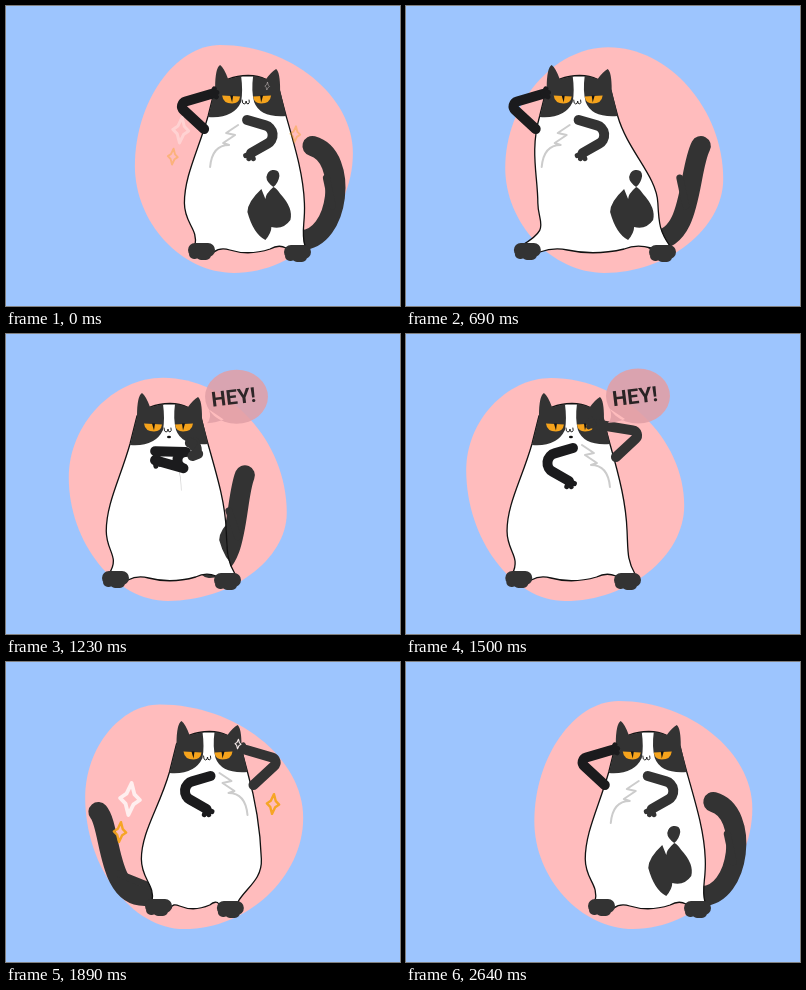
An HTML page with a canvas for the animation above (2.67 s loop, 394 by 300 pixels).

```html
<!DOCTYPE html>
<html lang="en">
<head>
<meta charset="utf-8">
<title>Dancing cat</title>
<style>
html, body { margin: 0; width: 100%; height: 100%; overflow: hidden; background: #9dc5fe; }
canvas { display: block; width: 394px; height: 300px; }
</style>
</head>
<body>
<canvas id="stage" width="394" height="300"></canvas>
<script>
const ctx = document.getElementById('stage').getContext('2d');
const LOOP = 2670, STEP = 30, BEAT = LOOP / 2;
const FUR = '#333', INK = '#1b1b1d', ORANGE = '#f5a31c';

// Smooth 0 to 1 between two times.
function ease(t, from, to) {
  const u = Math.min(1, Math.max(0, (t - from) / (to - from)));
  return u * u * (3 - 2 * u);
}
// 0 at home, 1 away: leaves during [a, b], returns during [c, d], once per loop.
const away = (t, a, b, c, d) => ease(t, a, b) - ease(t, c, d) + ease(t - LOOP, a, b);

const FACE = new Path2D(`M-40 111L-33 82Q-33 62-28 59Q-24 62-20 73L-7 70Q-5 85-7 96Q-15 113-40 111Z
  M38 110L32 84Q32 66 28 63Q23 66 18 73Q10 70 5 70Q3 85 6 96Q12 112 38 110Z`);
const MOUTH = new Path2D('M-6 94Q-6 98-4 98Q-2 98-2 95Q-2 98 0 98Q2 97 1 94');
const EYE = new Path2D('M-9-3L9-2Q8 5 1 5Q-8 5-9-3Z');
const PUPIL = new Path2D('M-1-3L2-3L1 4Z');
const FLUFF = new Path2D('M10 111L22 119L13 121L25 129L19 131Q36 131 38 153');
const PATCH = new Path2D(`M3 164Q10 163 10 170Q9 177 4 181Q-3 176-3 171Q-2 165 3 164Z
  M-8 183Q-22 196-22 206Q-16 228-4 234Q2 227 2 221Q14 224 21 214Q24 202 11 188Q7 182 4 181Q-4 188-4 193Z`);
const STAR = new Path2D('M0-16L4-5L10 0L4 5L0 16L-4 5L-10 0L-4-5Z');

function layer(draw, x = 0, y = 0, sx = 1, sy = sx) {
  ctx.save();
  ctx.translate(x, y);
  ctx.scale(sx, sy);
  draw();
  ctx.restore();
}
function fill(path, color) { ctx.fillStyle = color; ctx.fill(path); }
function stroke(path, color, width) { ctx.strokeStyle = color; ctx.lineWidth = width; ctx.stroke(path); }

// An egg that trails the cat while its four extremes wobble.
function drawBackdrop(t) {
  const phase = 2 * Math.PI * (t - 80) / LOOP, K = .53;
  const x = 203.5 + 35 * Math.cos(phase);
  const points = [
    [x - 21 + 15 * Math.sin(phase), 41.5 - 2.5 * Math.cos(phase)],
    [x + 109, 162 - 18 * Math.cos(phase + .8)],
    [x - 10, 267],
    [x - 109, 150 + 16 * Math.cos(phase - .7)]
  ];
  const p = new Path2D();
  p.moveTo(...points[0]);
  points.forEach(([ax, ay], i) => {
    const [bx, by] = points[(i + 1) % 4], dx = (bx - ax) * K, dy = (by - ay) * K;
    if (i % 2) p.bezierCurveTo(ax, ay + dy, bx - dx, by, bx, by);
    else p.bezierCurveTo(ax + dx, ay, bx, by - dy, bx, by);
  });
  fill(p, '#ffbcbd');
}

function drawTail(t) {
  const swing = 1 - 2 * away(t, 1050, 1890, 2260, 2600);
  const curl = 1 - away(t, 0, 380, 2300, 2640);
  const tail = new Path2D(), tuft = new Path2D();
  tail.moveTo(56 * swing, 234);
  tail.bezierCurveTo(95 * swing, 235, 90 * swing + 15 * curl, 165 - 15 * curl,
    103 * swing - 35 * curl, 145 - 5 * swing);
  tuft.moveTo(82 * swing, 192 - 20 * swing);
  tuft.lineTo(18 + 70 * swing, 212 - 12 * swing);
  stroke(tail, FUR, 20);
  stroke(tuft, FUR, 7);
}

function drawBody(t, head, hip, left, right) {
  const span = (right - left) / 100, slack = (hip + 50 - right) / 2;
  const p = new Path2D(`M${head - 40} 110C${head - 50} 145 ${hip - 60} 170 ${hip - 60} 197
    C${hip - 60} 218 ${hip - 46} 222 ${left - 6} 240L${left + 13} 246
    Q${left + 20 * span} 241 ${left + 30 * span} 244
    Q${(left + right) / 2} 250 ${right - 28 * span} 243
    Q${right - 19 * span} 238 ${right - 11} 242L${right + 8} 240
    C${right + 5 + slack} 226 ${hip + 61} 218 ${hip + 60} 197
    C${hip + 59} 170 ${head + 48} 145 ${head + 38} 110
    L${head + 31} 84Q${head + 20} 70 ${head} 69.5Q${head - 22} 70 ${head - 33} 82Z`);
  fill(p, '#fff');
  const turn = 25 + 12 * away(t, 0, 1000, 2290, 2600) + 62 * away(t, 1000, 1400, 2290, 2600);
  layer(() => {
    ctx.clip(p);
    ctx.translate(hip + turn, 0);
    fill(PATCH, FUR);
  });
  stroke(p, '#111', 1.3);
}

function drawFoot(x, y) {
  const p = new Path2D();
  p.roundRect(x - 13, y - 8, 27, 14, 7);
  p.roundRect(x - 12, y - 2, 11, 10, 5);
  p.roundRect(x - 5, y - 2, 15, 11, 5);
  fill(p, FUR);
}

function drawFace(t) {
  const open = 1 - away(t, 2130, 2190, 2310, 2370);
  fill(FACE, FUR);
  for (const side of [-1, 1]) {
    if (open > .02) layer(() => {
      fill(EYE, ORANGE);
      fill(PUPIL, '#111');
    }, side * 15.5 - 1.5, 92.5, -side, open);
  }
  stroke(MOUTH, '#222', 1);
  if (t > 900 && t < 1700) {
    const speaking = new Path2D();
    speaking.ellipse(-1, 103, 2, 1.3, 0, 0, 7);
    fill(speaking, '#111');
  }
}

// Both arms share one pose, mirrored; raise 1 is hand at the eyes, 0 is across the chest.
function drawArm(side, raise, reach, color) {
  const mix = (chest, raised) => chest + (raised - chest) * raise;
  const handX = mix(3, 37 - 30 * reach), handY = mix(147, 88 + 4 * reach);
  const arm = new Path2D(), fingers = new Path2D();
  arm.moveTo(mix(-1, 44), mix(114, 123));
  arm.arcTo(mix(40, 71), mix(126, 98), handX, handY, mix(10, 5));
  arm.lineTo(handX, handY);
  for (const spread of [-.75, 0, .75]) {
    const angle = mix(1.95, 3.4) + spread;
    fingers.moveTo(handX, handY);
    fingers.lineTo(handX + 6 * Math.cos(angle), handY + 6 * Math.sin(angle));
  }
  layer(() => {
    stroke(arm, color, 10);
    stroke(fingers, color, 5);
  }, 0, 0, side, 1);
}

function drawSparkles(x, y, scale, angle, alpha) {
  if (alpha <= 0) return;
  const star = (sx, sy, size, color) =>
    layer(() => { ctx.rotate(.1); stroke(STAR, color, 3.8); }, sx, sy, size);
  layer(() => {
    ctx.globalAlpha = alpha;
    ctx.rotate(angle);
    star(-54, 14, 1, '#fff2f2');
    star(-64, 47, .62, ORANGE);
    star(89, 19, .62, ORANGE);
    star(54, -41, .3, '#fff2f2');
  }, x, y, scale);
}

function drawBubble(t) {
  const grow = ease(t, 840, 1270), alpha = .9 * away(t, 840, 1270, 1600, 1740);
  if (alpha <= 0) return;
  layer(() => {
    ctx.globalAlpha = alpha;
    const p = new Path2D('M-28 13Q-25 22-30 27Q-20 26-13 23Z');
    p.ellipse(0, 0, 32, 27.5, 0, 0, 7);
    fill(p, '#e2a0a7');
    ctx.rotate(-.12);
    ctx.font = '700 21px Roboto, sans-serif';
    ctx.textAlign = 'center';
    ctx.textBaseline = 'middle';
    ctx.fillStyle = '#151515';
    ctx.fillText('HEY!', -3, 1);
  }, 171 + 61 * grow, 94 - 32 * grow, .3 + .7 * grow);
}

function draw(t) {
  const head = 243 - 79 * away(t, -60, 900, 1410, 2370);
  const hip = 241 - 82 * away(t, -160, 1340, 1400, 2460);
  const left = 195 - 86 * away(t, 0, 900, 1380, 2400);
  const right = 291 - 70 * away(t, 240, 1140, 1800, 2540);
  const swap = away(t, 1050, 1350, 2290, 2570);
  const reach = away(t % BEAT, 0, 330, 400, 560);

  ctx.fillStyle = '#9dc5fe';
  ctx.fillRect(0, 0, 394, 300);
  ctx.lineCap = ctx.lineJoin = 'round';
  drawBackdrop(t);
  layer(() => drawTail(t), hip);
  drawBody(t, head, hip, left, right);
  drawFoot(left, 245);
  drawFoot(right, 247);
  layer(() => {
    layer(() => stroke(FLUFF, '#ccc', 2), 0, 8 * (1 - swap), 2 * swap - 1, 1);
    drawFace(t);
    drawArm(-1, 1 - swap, reach, INK);
    drawArm(1, swap, reach, FUR);
  }, head);
  // One burst drifts off to the left, the next one spins away.
  drawSparkles(218 - .17 * t, 113, .8 + t / 2000, 0, .4 * (1 - ease(t, 0, 430)));
  drawSparkles(178, 123, .85 + .15 * ease(t, 1500, 1850), Math.max(0, t - 1890) / 350,
    .95 * away(t, 1500, 1850, 1890, 2610));
  drawBubble(t);
}

const start = performance.now();
function frame() {
  const t = (performance.now() - start) % LOOP;
  draw(Math.floor(t / STEP) * STEP);
  requestAnimationFrame(frame);
}
frame();
</script>
</body>
</html>
```
